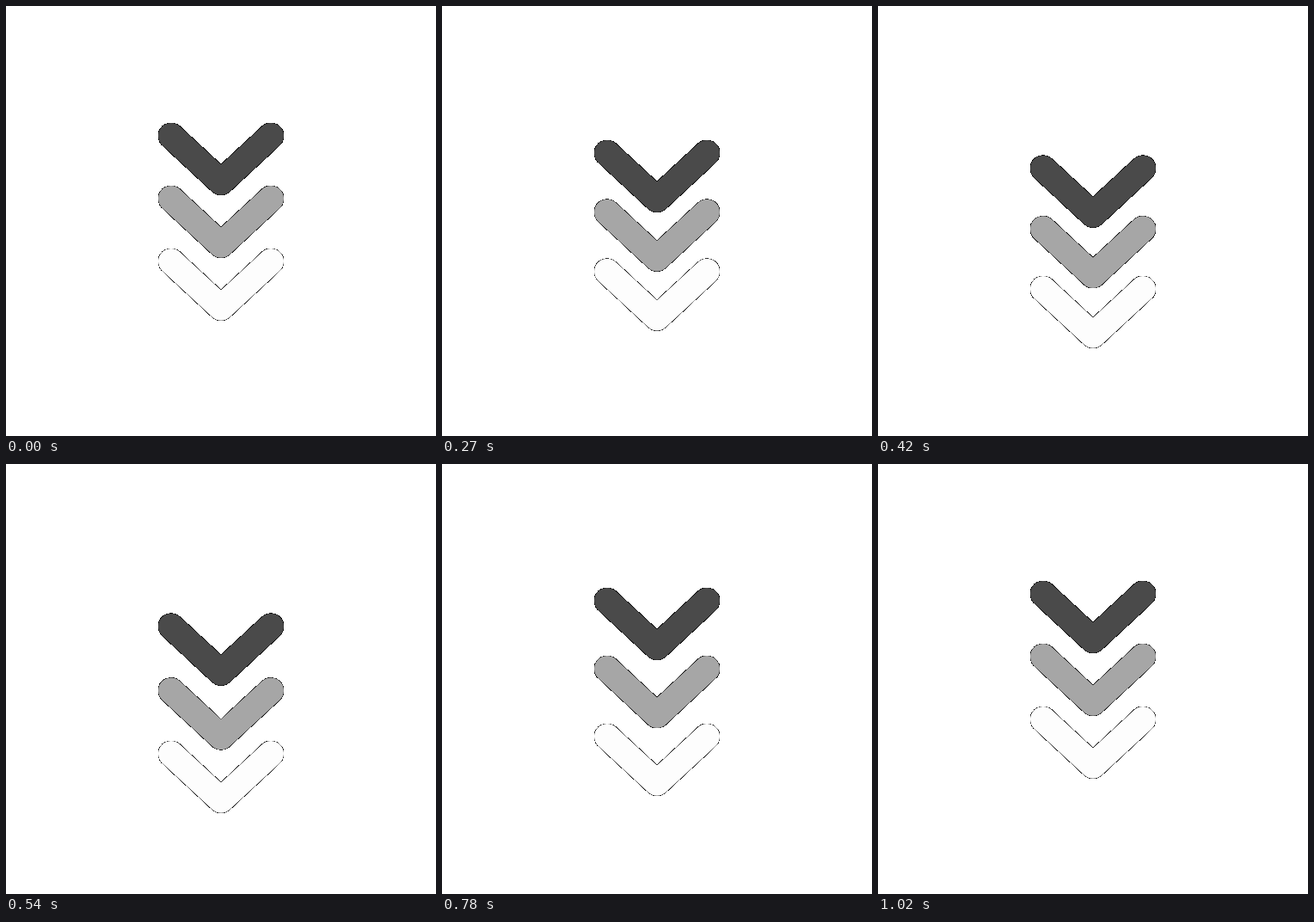
Animation of 500x500 px, one loop 1050 ms. Source, as an HTML page with a canvas:

```html
<!DOCTYPE html>
<html lang="en">
<head>
<meta charset="utf-8">
<title>Scroll down arrows</title>
<style>
  html, body { margin: 0; width: 100%; height: 100%; overflow: hidden; background: #fff; }
  canvas { display: block; width: 500px; height: 500px; }
</style>
</head>
<body>
<canvas id="stage" width="500" height="500"></canvas>
<script>
const STEP = 30;
const LOOP = 1050;
const TRAVEL = 40;
const AREA = [170, 130, 160, 284];

// Start, lowest point and end of each move, counted in steps.
const arrows = [
  { y: 151, color: '#4a4a4a', start: 2, low: 16, end: 30 },
  { y: 224, color: '#a6a6a6', start: 3, low: 17, end: 32 },
  { y: 297, color: '#fdfdfd', start: 4, low: 18, end: 34 }
];

const ctx = document.getElementById('stage').getContext('2d', { willReadFrequently: true });

function ease(from, to, step) {
  const p = Math.min(1, Math.max(0, (step - from) / (to - from)));
  return p * p * (3 - 2 * p);
}

function offset({ start, low, end }, step) {
  return TRAVEL * (ease(start, low, step) - ease(low, end, step));
}

function drawArrow(y, color) {
  ctx.strokeStyle = color;
  ctx.beginPath();
  ctx.moveTo(192, y);
  ctx.lineTo(250, y + 53.8);
  ctx.lineTo(308, y);
  ctx.stroke();
}

// Hard outline: soft edge pixels become opaque and fade to black.
function hardenEdges() {
  const image = ctx.getImageData(...AREA);
  const px = image.data;
  for (let i = 0; i < px.length; i += 4) {
    const alpha = px[i + 3];
    if (alpha === 0 || alpha === 255) continue;
    for (let c = 0; c < 3; c++) px[i + c] *= alpha / 255;
    px[i + 3] = 255;
  }
  ctx.putImageData(image, AREA[0], AREA[1]);
}

function draw(step) {
  ctx.clearRect(0, 0, 500, 500);
  ctx.lineWidth = 30;
  ctx.lineCap = ctx.lineJoin = 'round';
  for (const arrow of arrows) drawArrow(arrow.y + offset(arrow, step), arrow.color);
  hardenEdges();
}

const begin = performance.now();
let shown = -1;

function tick() {
  const step = Math.floor(((performance.now() - begin) % LOOP) / STEP);
  if (step !== shown) draw(shown = step);
  requestAnimationFrame(tick);
}
tick();
</script>
</body>
</html>
```
